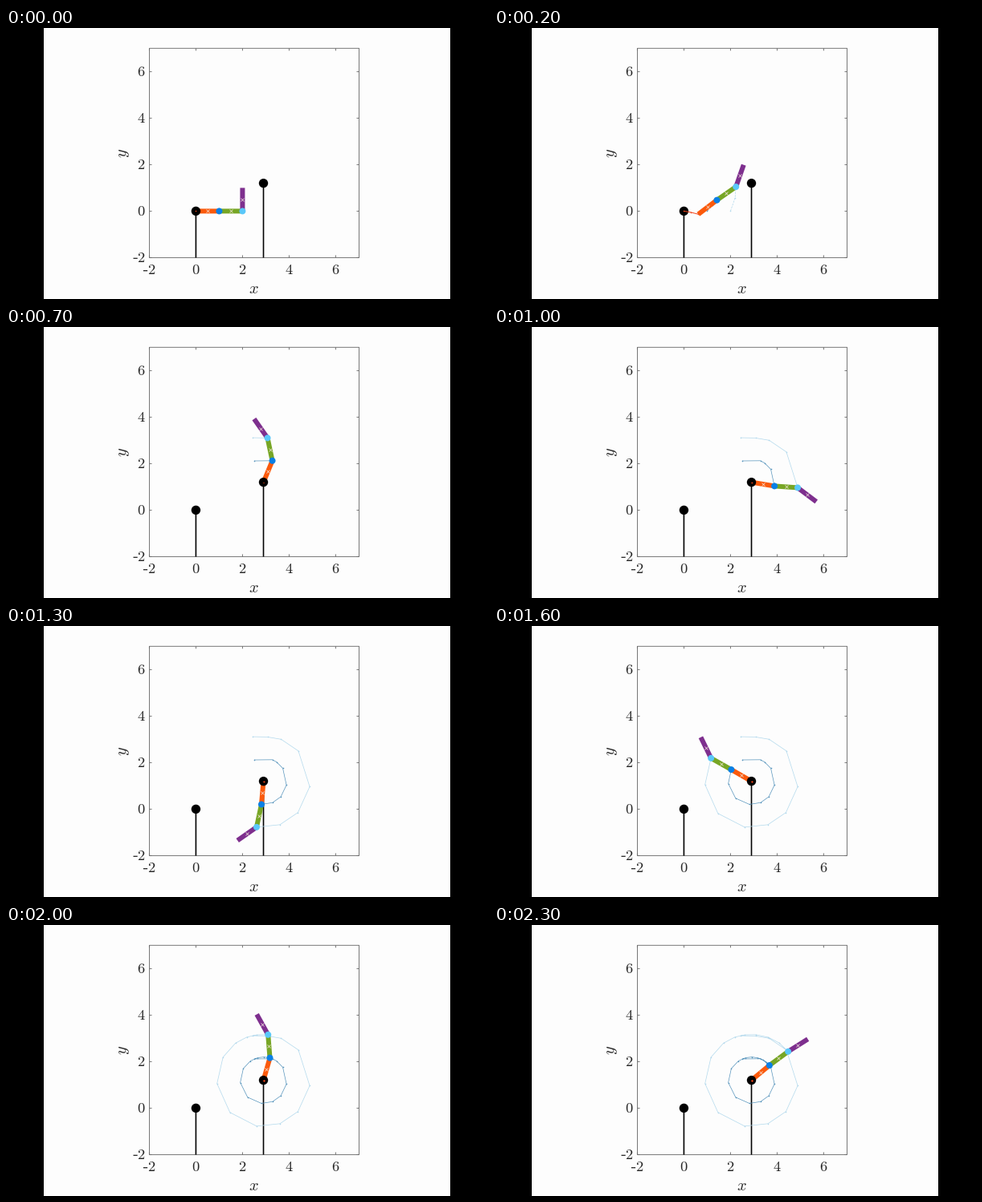
Recreate the animation shown at these times as a matplotlib script. Size 600x338 px, loop 2.4 s.

```python
import numpy as np
import matplotlib.pyplot as plt
from matplotlib.animation import FuncAnimation
from matplotlib.patches import Circle, Rectangle

W, H, DPI = 600, 338, 100
PX = 72 / DPI                       # points per pixel
STEPS, CATCH = 24, 6                # poses per loop, step of the landing
plt.rcParams["mathtext.fontset"] = "cm"

ORANGE, GREEN, PURPLE = "#fb5a0c", "#77a625", "#7e2f8e"
BLUE, SKY = "#0a80e6", "#5ac8fa"
INK, FRAME = "#262626", "#6a6a6a"
POSTS = [(0, 0), (2.9, 1.2)]

# key poses: step, then the three link angles in degrees
FLIGHT = np.array([(0, 0, 0, 90), (4, 75, 67.5, 57), (6, 113.5, 94, 57)])
SWING = np.array([
    (7, 67.6, 102, 125), (9, 34, 48, 20), (10, -9.5, -4, -37),
    (13, -95, -102, -145), (16, -210, -209.5, -244),
    (20, -286, -265.5, -241), (23, -320.3, -323.5, -327.7),
])


def glide(keys, t):
    """Smooth cubic path through the key poses."""
    times, pose = keys[:, 0], keys[:, 1:]
    slope = np.gradient(pose, times, axis=0)
    k = np.clip(np.searchsorted(times, t, "right") - 1, 0, len(times) - 2)
    h = times[k + 1] - times[k]
    s = (t - times[k]) / h
    ease = s * s * (3 - 2 * s)
    return (pose[k] + ease * (pose[k + 1] - pose[k])
            + h * s * (1 - s) * ((1 - s) * slope[k] - s * slope[k + 1]))


def to_px(x, y):
    return 236.4 + 29 * np.asarray(x), 228.4 - 29 * np.asarray(y)


def joints(t):
    """Pixel positions of the four joints at step t, shape (4, 2)."""
    if t <= CATCH:
        base = 0.288 * t + 0.00542 * t**3, t**2 * (t - 4) / 60
        a = np.radians(glide(FLIGHT, t))
    else:
        base = POSTS[1]
        a = np.radians(glide(SWING, t))
    x = base[0] + np.r_[0, np.cumsum(np.cos(a))]
    y = base[1] + np.r_[0, np.cumsum(np.sin(a))]
    return np.column_stack(to_px(x, y))


fig = plt.figure(figsize=(W / DPI, H / DPI), dpi=DPI, facecolor="black")
ax = fig.add_axes([0, 0, 1, 1])
ax.set(xlim=(0, W), ylim=(H, 0))
ax.axis("off")
ax.add_patch(Rectangle((47, 0), 506, H, fc="#fdfdfd", lw=0))


def line(x, y, color, width, **kw):
    return ax.plot(x, y, color=color, lw=width * PX, snap=False,
                   solid_capstyle="butt", **kw)[0]


def disc(center, radius, color, z):
    return ax.add_patch(Circle(center, radius, fc=color, lw=0, zorder=z))


def trail_line(color, width, z):
    return line([], [], color, width, marker="o", ms=1.6 * PX, mew=0, zorder=z)


def label(x, y, s, size=18.5, ha="center", va="baseline", **kw):
    ax.text(x, y, f"${s}$", fontsize=size * PX, color=INK, ha=ha, va=va, **kw)


def draw_axes():
    left, right, top, bottom = 178.5, 439.5, 25.3, 286.4
    line([left, right, right, left, left], [top, top, bottom, bottom, top],
         FRAME, 0.9)
    for v in range(-2, 7, 2):
        x, y = to_px(v, v)
        for edge, d in ((bottom, -3), (top, 3)):
            line([x, x], [edge, edge + d], FRAME, 0.9)
        for edge, d in ((left, 3), (right, -3)):
            line([edge, edge + d], [y, y], FRAME, 0.9)
        label(x + (3 if v < 0 else 0), 307, abs(v))
        label(173.5, y + 5.2, abs(v), ha="right")
        if v < 0:
            line([x - 7.5, x - 2.3], [302.7] * 2, INK, 1.3)
            line([158.5, 163.7], [y + 0.9] * 2, INK, 1.3)
    label(308.5, 331, "x", 20.5)
    label(146, 156, "y", 20.5, va="center", rotation=90)


draw_axes()

for post in POSTS:
    x, y = to_px(*post)
    line([x, x], [y, 286.5], "black", 1.6, zorder=3)
    disc((x, y), 5.7, "black", 7)

trails = [trail_line("#f4481e", 1.0, 8), trail_line("#5795bd", 0.7, 4),
          trail_line("#b2d9ed", 0.7, 4)]
links = [line([], [], c, 6, zorder=5) for c in (ORANGE, GREEN, PURPLE)]
crosses = line([], [], "#f3e6dc", 0, marker="x", ms=3.6 * PX, mew=0.7 * PX,
               zorder=6)
hinges = [disc((0, 0), 4, c, 9) for c in (BLUE, SKY)]


def update(i):
    p = joints(i)
    for k, link in enumerate(links):
        link.set_data(p[k:k + 2, 0], p[k:k + 2, 1])
    mid = (p[:-1] + p[1:]) / 2
    crosses.set_data(mid[:, 0], mid[:, 1])
    for hinge, pos in zip(hinges, p[1:]):
        hinge.center = pos

    # the trails restart once the arm has landed
    flying = i <= CATCH
    path = np.array([joints(t) for t in range(0 if flying else CATCH, i + 1)])
    for k, trail in enumerate(trails):
        trail.set_data(path[:, k, 0], path[:, k, 1])
        trail.set_linestyle("--" if flying and k else "-")
    trails[0].set_alpha(1 if flying else 0.4)
    return [*trails, *links, crosses, *hinges]


anim = FuncAnimation(fig, update, frames=STEPS, interval=100, repeat=True)
plt.show()
```
